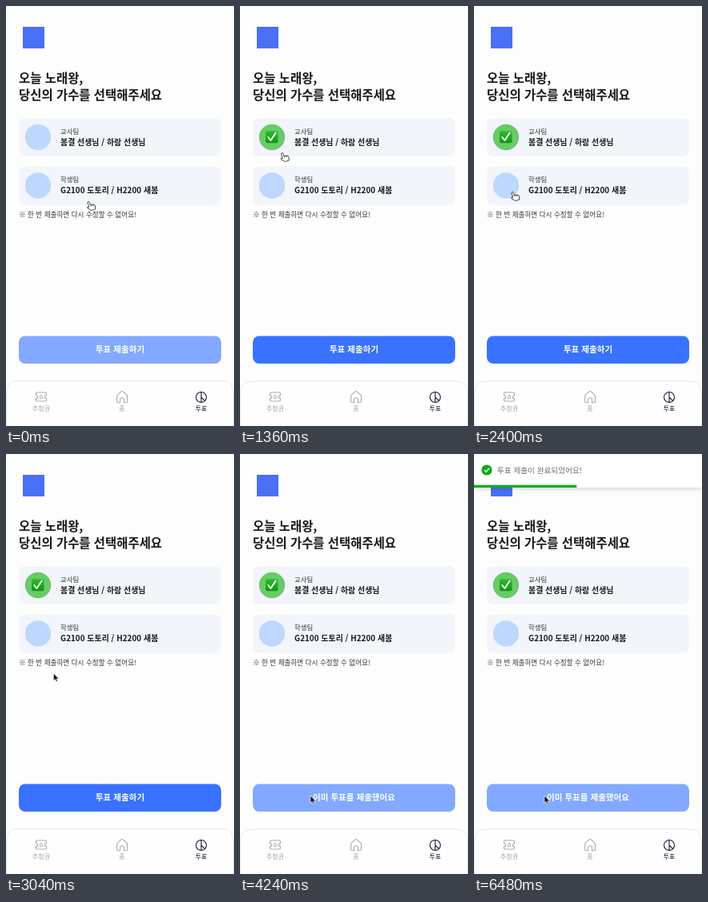
Write an HTML page that moves like this. It is 285x525 px and loops after 6.56 s.

```html
<!DOCTYPE html>
<html lang="ko">
<head>
<meta charset="utf-8">
<style>
  html, body { margin: 0; height: 100%; overflow: hidden; background: #fdfdfe; }
  svg { display: block; width: 100%; height: 100%; }
  text { font-family: "Noto Sans CJK KR", "Noto Sans CJK", sans-serif; fill: #17181c; }
  .title { font-size: 15.45px; font-weight: 700; }
  .team { font-size: 8.4px; fill: #36393f; }
  .names { font-size: 9.95px; font-weight: 700; }
  .note { font-size: 8.6px; fill: #34373c; }
  .label { font-size: 10.55px; font-weight: 700; fill: #fff; text-anchor: middle; }
  .nav { font-size: 7.9px; font-weight: 500; fill: #a5a6aa; text-anchor: middle; }
  .nav.on { fill: #17182c; }
  .icon { fill: none; stroke: #a9aaae; stroke-width: 1.1; stroke-linejoin: round; stroke-linecap: round; }
  .icon.on { stroke: #1a1b38; }
  .message { font-size: 9.65px; fill: #707174; }
  .shadow { filter: drop-shadow(0 1px 3px #0003); }
</style>
</head>
<body>
<svg viewBox="0 0 285 525">
  <defs>
    <linearGradient id="badge" x2="0" y2="1">
      <stop stop-color="#2fbb2a"/><stop offset="1" stop-color="#0c981b"/>
    </linearGradient>
  </defs>

  <rect x="21" y="26" width="27" height="27" fill="#4a70f5"/>
  <text class="title" x="16" y="96.300">오늘 노래왕,</text>
  <text class="title" x="16" y="116.500">당신의 가수를 선택해주세요</text>

  <g fill="#f2f5f9">
    <rect x="16" y="140" width="253" height="48" rx="8"/>
    <rect x="16" y="200.500" width="253" height="48" rx="8"/>
  </g>
  <circle id="choice" cx="40" cy="164" r="16.200"/>
  <circle cx="40" cy="224.500" r="16.200" fill="#bdd7ff"/>
  <g id="check">
    <rect x="32" y="156.300" width="15.500" height="15" rx="2" fill="url(#badge)"/>
    <path d="M35.300 164l3.100 4 6.300-9.500" fill="none" stroke="#fff" stroke-width="2" stroke-linecap="round" stroke-linejoin="round"/>
  </g>
  <text class="team" x="68" y="159.700">교사팀</text>
  <text class="names" x="68" y="173.700">봄결 선생님 / 하람 선생님</text>
  <text class="team" x="68" y="220">학생팀</text>
  <text class="names" x="68" y="234">G2100 도토리 / H2200 새봄</text>
  <text class="note" x="16" y="263.800">※ 한 번 제출하면 다시 수정할 수 없어요!</text>

  <rect id="button" x="16" y="412.500" width="253" height="34.500" rx="8"/>
  <text id="label" class="label" x="142.500" y="432.800"></text>

  <path d="M.5 526V483q0-14 14-14h256q14 0 14 14v43" fill="#fefefe" stroke="#e8e9ec"/>
  <g class="icon">
    <path d="M39 483h10q1.500 0 1.500 1.500v2a2 2 0 0 0 0 4v2q0 1.500-1.500 1.500H39q-1.500 0-1.500-1.500v-2a2 2 0 0 0 0-4v-2q0-1.500 1.500-1.500z"/>
    <path d="M44 486.200l.8 1.600 1.700.2-1.200 1.200.3 1.700-1.600-.8-1.600.8.300-1.700-1.200-1.200 1.700-.2z" stroke-width=".8"/>
    <path d="M138.700 487.500q0-.8.700-1.400l4.800-4.200q.9-.7 1.800 0l4.800 4.200q.7.600.7 1.400v6.700q0 1.500-1.500 1.500h-2.500v-4q0-2-2.400-2t-2.400 2v4h-2.500q-1.500 0-1.500-1.500z"/>
  </g>
  <path class="icon on" d="M237.500 489a6.500 6.500 0 1 0 13 0a6.500 6.500 0 1 0-13 0M244 482.500v13M244 489l4.600 4.600"/>
  <text class="nav" x="44" y="505.600">추첨권</text>
  <text class="nav" x="145" y="505.600">홈</text>
  <text class="nav on" x="244" y="505.600">투표</text>

  <g id="toast">
    <rect class="shadow" width="285" height="42" fill="#fff"/>
    <g id="tick">
      <circle r="6.600" fill="#0dac17"/>
      <path d="M-3 .2l2.200 2.200 3.800-4.600" fill="none" stroke="#fff" stroke-width="1.500"/>
    </g>
    <text class="message" x="29" y="23.500">투표 제출이 완료되었어요!</text>
    <rect id="bar" y="38.700" height="3.300" fill="#0bb013"/>
  </g>

  <g id="cursor" stroke-linejoin="round">
    <g id="hand" fill="#fff" stroke="#222" stroke-width=".8">
      <g transform="rotate(-18) scale(.95)">
        <path d="M-1.300 1Q-1.300-.4 0-.4T1.300 1V4.400L5.600 5.200Q7 5.600 6.800 7.200L6 11.800H.4L-3.600 7.300Q-4.300 5.900-2.800 5.700L-1.300 6.800Z"/>
        <path d="M1.300 4.400v2M3.200 4.900v1.700M5 5.200v1.600" fill="none" stroke-width=".6"/>
      </g>
    </g>
    <path id="arrow" d="M0 0V9.400L2.100 7.500 3.500 10.600 5.100 9.900 3.800 6.900H6.700Z" fill="#111" stroke="#fff" stroke-width=".7"/>
  </g>
</svg>
<script>
  const LOOP = 6560, STEP = 80, PICK = 960, SUBMIT = 4130, ENTER = 700, CLOSE = 3000;
  const el = id => document.getElementById(id);
  const set = (id, name, value) => el(id).setAttribute(name, value);
  const show = (id, on) => set(id, 'visibility', on ? 'visible' : 'hidden');
  const clamp = v => Math.min(1, Math.max(0, v));
  const smooth = p => p * p * (3 - 2 * p);
  const easeOut = p => 1 - (1 - p) ** 3;

  // Each stop is a time followed by values.
  const path = [[0, 103, 245], [400, 92, 228], [480, 92, 228], [880, 46, 172], [1160, 46, 172],
    [1360, 52.5, 184], [1840, 47.5, 232], [2400, 48, 233], [2800, 50, 238], [3520, 86, 377], [3840, 88, 427]];
  const bounce = [[0, 3000], [.6, -25], [.75, 10], [.9, -5], [1, 0]];

  function sample(stops, t, ease) {
    const i = stops.findIndex(s => s[0] > t);
    if (i < 0) return stops.at(-1).slice(1);
    const a = stops[i - 1], b = stops[i];
    const p = ease((t - a[0]) / (b[0] - a[0]));
    return a.slice(1).map((v, k) => v + (b[k + 1] - v) * p);
  }

  function draw(t) {
    const picked = t >= PICK, sent = t >= SUBMIT, since = t - SUBMIT;
    const [x, y] = sample(path, t, smooth);
    const inside = (top, bottom) => y >= top && y <= bottom;

    set('choice', 'fill', picked ? '#69ca69' : '#bdd7ff');
    show('check', picked);
    set('button', 'fill', picked && !sent ? '#3872ff' : '#82a9ff');
    el('label').textContent = sent ? '이미 투표를 제출했어요' : '투표 제출하기';

    const hand = inside(140, 188) || inside(200, 248.5) || (!sent && inside(412, 447));
    set('cursor', 'transform', `translate(${x} ${y})`);
    show('hand', hand);
    show('arrow', !hand);

    show('toast', sent);
    const [shift] = sample(bounce, Math.max(0, since / ENTER), easeOut);
    set('toast', 'transform', `translate(${shift * .656})`);
    set('tick', 'transform', `translate(16 20) scale(${.3 + .7 * clamp(since / 300)})`);
    set('bar', 'width', 285 * (1 - clamp((since - ENTER) / CLOSE)));
  }

  const start = performance.now();
  function frame() {
    const t = (performance.now() - start) % LOOP;
    draw(Math.floor(t / STEP) * STEP);
    requestAnimationFrame(frame);
  }
  frame();
</script>
</body>
</html>
```
